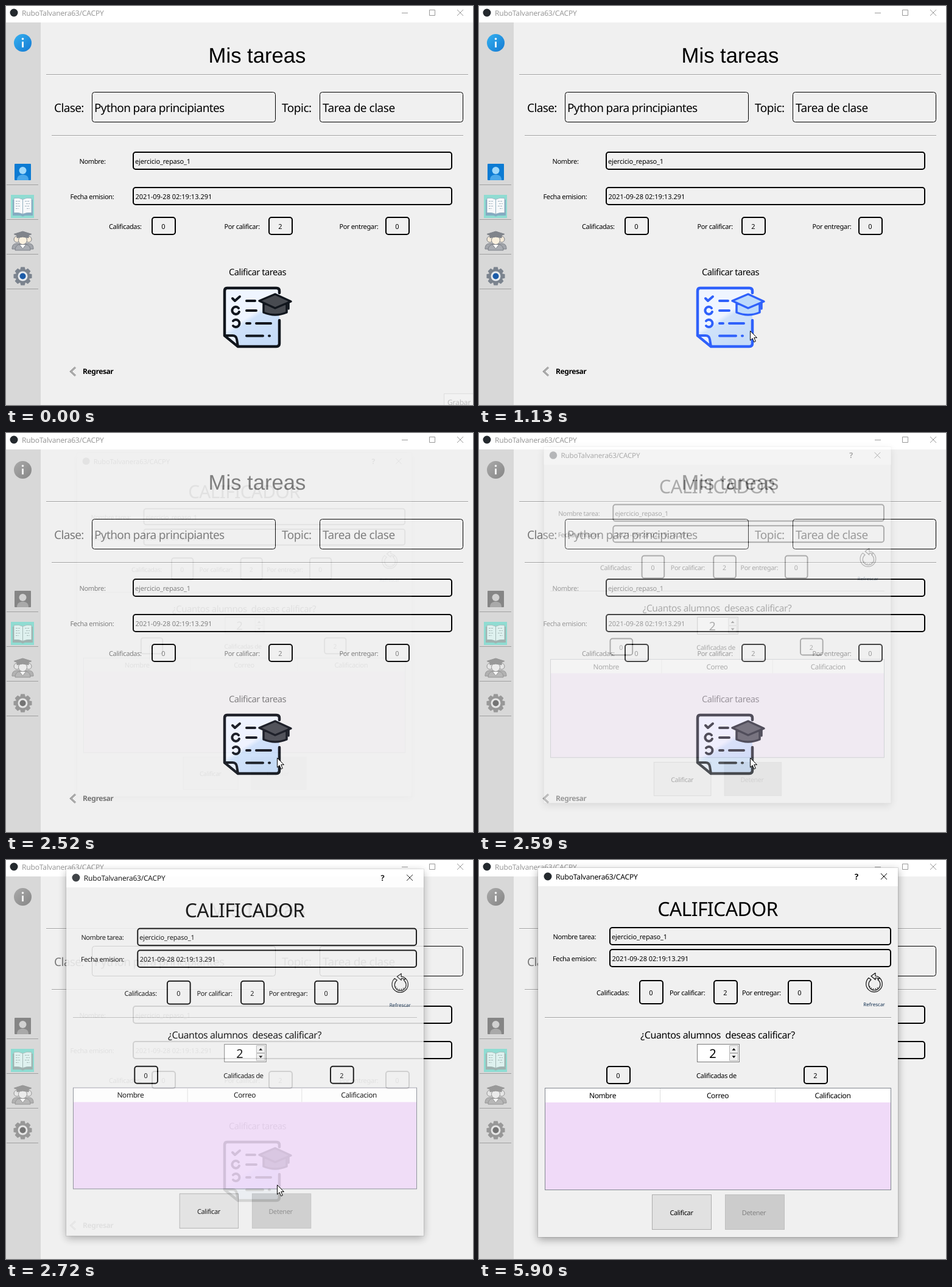
These frames come from a looping animation (767x655 px, 8000 ms). An HTML page:

```html
<!DOCTYPE html>
<html lang="es">
<head>
<meta charset="utf-8">
<title>Mis tareas</title>
<style>
html, body { margin: 0; width: 100%; height: 100%; overflow: hidden; background: #f0f0f0; }
svg { display: block; width: 767px; height: 655px; }
text {
  font: 11px "Noto Sans", "Open Sans", sans-serif;
  letter-spacing: -.033em;
  text-rendering: geometricPrecision;
}
.mid { text-anchor: middle; }
.num { letter-spacing: 0; }
.file { letter-spacing: -.015em; }
.wide { letter-spacing: -.025em; }
.win { font-size: 12px; letter-spacing: -.015em; }
.head { font-size: 12px; }
.big { font-size: 19px; }
.page { font: 34.67px "Liberation Sans", Arial, sans-serif; letter-spacing: 0; }
.box { fill: none; stroke: #000; stroke-width: 2; }
.thin { stroke-width: 1; }
.line { fill: none; stroke: currentColor; }
.rule { stroke: #a0a0a0; }
.lite { stroke: #fff; }

/* every state is held until the next key */
.main, .bar, .side, .task, .grab, .label, .cursor, .click, .dialog {
  animation: 8s step-end infinite;
}
.bar { animation-name: focus; }
.bar text { fill: currentColor; }
.main { animation-name: disable; }
.side { animation-name: gray; }
.task { animation-name: hover; }
.grab { animation-name: leave; }
.label { animation-name: dim; }
.cursor { animation-name: move; }
.click { animation-name: click; }
.dialog { animation-name: open; transform-origin: 393px 316px; }

@keyframes focus {
  0%, 31.5%, 100% { color: #999; }
  29.875% { color: #000; }
}
@keyframes disable {
  0%, 100% { fill: #000; }
  31.5%, 99.99% { fill: #787878; }
}
@keyframes gray {
  0%, 100% { filter: none; }
  31.5%, 99.99% { filter: grayscale(1) opacity(.75); }
}
@keyframes hover {
  0%, 31.5%, 100% { color: #11161d; --cap: #484b51; }
  13.375% { color: #2f61fb; --cap: #bddafb; }
}
@keyframes leave {
  0% { opacity: 1; }
  6.75% { opacity: .66; }
  7.5% { opacity: .33; }
  8.375%, 100% { opacity: 0; }
}
@keyframes dim {
  0% { opacity: 1; }
  .875%, 100% { opacity: .85; }
}
@keyframes move {
  0% { opacity: 0; transform: translate(742px, 640px); }
  11.75% { opacity: 1; transform: translate(742px, 640px); }
  12.5% { opacity: 1; transform: translate(579px, 581px); }
  13.375% { opacity: 1; transform: translate(465px, 541px); }
  14.125% { opacity: 1; transform: translate(445px, 533px); }
  73.75%, 100% { opacity: 0; transform: translate(445px, 533px); }
}
@keyframes click {
  0%, 30.625%, 100% { opacity: 0; }
  29.875% { opacity: 1; }
}
@keyframes open {
  0% { opacity: 0; transform: scale(.9); }
  31.5% { opacity: .06; transform: translate(-1px, -1px) scale(.93); }
  32.375% { opacity: .29; transform: translate(-1px, -.7px) scale(.9645); }
  33.125% { opacity: .65; transform: scale(.983); }
  34% { opacity: .87; transform: scale(.993); }
  34.75% { opacity: .97; transform: scale(.998); }
  35.625%, 100% { opacity: 1; transform: none; }
}
.shade { filter: drop-shadow(0 4px 7px rgba(0, 0, 0, .34)); }
</style>
</head>
<body>
<svg viewBox="0 0 767 655">
  <defs>
    <linearGradient id="paper" x1="0" y1="0" x2=".6" y2="1">
      <stop offset=".55" stop-color="#eff5ff"/>
      <stop offset=".62" stop-color="#cfe2fa"/>
      <stop offset="1" stop-color="#c6dcf8"/>
    </linearGradient>
    <linearGradient id="blue" x1="0" y1="0" x2="1" y2="1">
      <stop offset="0" stop-color="#35b1f0"/>
      <stop offset="1" stop-color="#1479d2"/>
    </linearGradient>
    <path id="tooth" d="M-3.2-15h6.4l1.4 6h-9.2z"/>
    <path id="close" class="line" d="M-5-5l10 10M5-5l-10 10"/>
  </defs>

  <rect width="767" height="655" fill="#f0f0f0"/>
  <rect y="27" width="57" height="628" fill="#d8d8d8"/>

  <!-- window bar -->
  <g class="bar">
    <rect width="767" height="27" fill="#fff"/>
    <circle cx="13" cy="11" r="6.5" fill="#24292e"/>
    <text class="win" x="26" y="16">RuboTalvanera63/CACPY</text>
    <path class="line" d="M650 11.5h10M695.5 6.5h9v9h-9z"/>
    <use href="#close" x="746" y="11"/>
  </g>

  <!-- side bar -->
  <path class="rule" d="M1 293.5h52M1 350.5h52M1 407.5h52M1 464.5h52"/>
  <rect x="8" y="310" width="38" height="38" fill="#8fdcd2"/>
  <g class="side">
    <circle cx="27.5" cy="60.5" r="14.5" fill="url(#blue)"/>
    <circle cx="27.5" cy="54" r="1.8" fill="#fff"/>
    <path d="M27.5 58.5v9.5" stroke="#fff" stroke-width="2.8"/>

    <rect x="14" y="259" width="27" height="27" rx="1" fill="#0c7bd3"/>
    <path d="M18 286c0-7 4-9 9.5-9s9.5 2 9.5 9z" fill="#4aa8ea"/>
    <circle cx="27.5" cy="270" r="6" fill="#9fd8fa"/>

    <path d="M11 318h33v26h-13l-3.5 1.5-3.5-1.5h-13z" fill="#84abc2"/>
    <path d="M13 315.5q8-1.5 14.5 2v24q-7-3-14.5-2zM42 315.5q-8-1.5-14.5 2v24q7-3 14.5-2z" fill="#f6f8fa" stroke="#8fabbb" stroke-width=".8"/>
    <path d="M16 320.5h8M16 324.5h6M16 328.5h8M16 332.5h5M31 320.5h8M33 324.5h6M31 328.5h8M34 332.5h5" stroke="#a3b4c0" stroke-dasharray="3 1"/>

    <g stroke="#7b7f86">
      <path d="M10 399c0-7 3-9 8-9h19c5 0 8 2 8 9z" fill="#a3a6ac"/>
      <circle cx="18" cy="383" r="5" fill="#f3e8d6"/>
      <circle cx="37" cy="383" r="5" fill="#f3e8d6"/>
      <path d="M15 401c0-8 5-10 12.5-10s12.5 2 12.5 10z" fill="#a9acb2"/>
      <path d="M22 391.500l5.5 7 5.5-7z" fill="#fff"/>
      <circle cx="27.5" cy="384.5" r="7" fill="#faf0de"/>
      <path d="M13 374.5l14.5-4.5 14.5 4.5-5 2v4q-9.5-3-19 0v-4z" fill="#80848b"/>
    </g>

    <g transform="translate(27.5 443.5)" fill="#7b838e">
      <circle r="11.5"/>
      <use href="#tooth"/>
      <use href="#tooth" transform="rotate(45)"/>
      <use href="#tooth" transform="rotate(90)"/>
      <use href="#tooth" transform="rotate(135)"/>
      <use href="#tooth" transform="rotate(180)"/>
      <use href="#tooth" transform="rotate(225)"/>
      <use href="#tooth" transform="rotate(270)"/>
      <use href="#tooth" transform="rotate(315)"/>
      <circle r="8" fill="#e6eaee"/>
      <circle r="5" fill="#1b5ba8"/>
    </g>
  </g>

  <!-- task page -->
  <path class="rule" d="M66 112.5h693M75 212.5h676"/>
  <path class="lite" d="M66 113.5h693M75 213.5h676"/>
  <g class="box">
    <g class="thin">
      <rect x="141.5" y="141.5" width="301" height="49" rx="4"/>
      <rect x="515.5" y="141.5" width="235" height="49" rx="4"/>
    </g>
    <rect x="209" y="240" width="523" height="28" rx="4"/>
    <rect x="209" y="298" width="523" height="28" rx="4"/>
    <rect x="240" y="347" width="38" height="28" rx="4"/>
    <rect x="432" y="347" width="38" height="28" rx="4"/>
    <rect x="624" y="347" width="38" height="28" rx="4"/>
  </g>
  <g class="main">
    <text class="page mid" x="412.5" y="93">Mis tareas</text>
    <text class="big" x="79" y="174">Clase:</text>
    <text class="big" x="145" y="174">Python para principiantes</text>
    <text class="big wide" x="453" y="174">Topic:</text>
    <text class="big wide" x="520" y="174">Tarea de clase</text>
    <text x="120.5" y="259">Nombre:</text>
    <text class="file" x="212" y="259">ejercicio_repaso_1</text>
    <text x="105.5" y="317">Fecha emision:</text>
    <text class="num" x="212.5" y="317">2021-09-28 02:19:13.291</text>
    <text x="169" y="366">Calificadas:</text>
    <text x="358.5" y="366">Por calificar:</text>
    <text x="547.5" y="366">Por entregar:</text>
    <text class="mid num" x="258.5" y="366">0</text>
    <text class="mid num" x="450.5" y="366">2</text>
    <text class="mid num" x="642.5" y="366">0</text>
    <text class="mid" x="413" y="442" style="font-size:14.67px">Calificar tareas</text>
    <text x="126" y="604" style="font-size:12px;font-weight:700">Regresar</text>
  </g>
  <path d="M114 593l-7.5 7 7.5 7" fill="none" stroke="#8a8a8a" stroke-width="3"/>
  <path d="M114 593l-7.5 7 7.5 7" fill="none" stroke="#d5d5d5"/>

  <g class="task" stroke="currentColor" stroke-width="4.5" stroke-linecap="round" stroke-linejoin="round">
    <path d="M363 463h81q5 0 5 5v86q0 5-5 5h-63l-22-18v-73q0-5 4-5z" fill="url(#paper)" stroke="none"/>
    <path d="M449 471v-3q0-5-5-5h-81q-4 0-4 5v73l22 18h63q5 0 5-5v-38" fill="none"/>
    <path d="M359 541h13q6 0 7 6l2 12z" fill="#e9f1fd" stroke-width="4"/>
    <g fill="none" stroke-width="4">
      <path d="M372 480l4 4 8-7M395 484h14M395 500h16M395 521h6M411 521h24M395 541.5h27M432 541.5h1"/>
      <path d="M382 496a6 6 0 1 0 1 6M373 517a6 6 0 1 1 0 8"/>
    </g>
    <g stroke-width="3.5" style="fill:var(--cap)">
      <path d="M423 489v14q19 8 38 0v-14z"/>
      <path d="M416 484l26-11 26 12-26 11z"/>
      <path d="M464 487v10" fill="none"/>
    </g>
  </g>

  <g class="grab">
    <rect x="719.5" y="636.5" width="60" height="40" fill="#f2f2f2" stroke="#dedede"/>
    <text class="win label" x="725" y="655" fill="#bcbcbc">Grabar</text>
  </g>

  <!-- grading dialog -->
  <g class="dialog">
    <rect class="shade" x="97" y="13" width="591" height="606" fill="#f0f0f0"/>
    <rect x="96.5" y="12.5" width="592" height="607" fill="none" stroke="#000" stroke-opacity=".1"/>
    <rect x="97" y="13" width="591" height="30" fill="#fff"/>
    <circle cx="113" cy="27" r="6.5" fill="#24292e"/>
    <text class="win" x="126" y="32">RuboTalvanera63/CACPY</text>
    <text class="mid" x="620" y="32" style="font-size:13px;font-weight:600">?</text>
    <use href="#close" x="665" y="27"/>

    <text class="mid" x="392" y="92" style="font-size:32px;letter-spacing:-.02em">CALIFICADOR</text>
    <text x="121.5" y="130">Nombre tarea:</text>
    <text class="file" x="218" y="130">ejercicio_repaso_1</text>
    <text x="121" y="166">Fecha emision:</text>
    <text class="num" x="218.5" y="166">2021-09-28 02:19:13.291</text>
    <text x="193" y="222">Calificadas:</text>
    <text x="313" y="222">Por calificar:</text>
    <text x="432" y="222">Por entregar:</text>
    <text class="mid num" x="282.5" y="222">0</text>
    <text class="mid num" x="404.5" y="222">2</text>
    <text class="mid num" x="526.5" y="222">0</text>
    <g class="box">
      <rect x="215" y="111" width="461" height="28" rx="4"/>
      <rect x="215" y="147" width="461" height="28" rx="4"/>
      <rect x="264" y="198" width="38" height="38" rx="4"/>
      <rect x="386" y="198" width="38" height="38" rx="4"/>
      <rect x="508" y="198" width="38" height="38" rx="4"/>
      <rect x="210" y="339" width="38" height="28" rx="4"/>
      <rect x="534" y="339" width="38" height="28" rx="4"/>
    </g>

    <g fill="none" stroke="#111" stroke-width="1.2" stroke-linejoin="round">
      <path d="M640 193.500a13.300 13.300 0 1 0 18 0l-3 3a9.500 9.500 0 1 1-11 0z"/>
      <path d="M651 185.500l-7 5 7 6v-3q4 0 5 2l2-2q-3-3-7-3z"/>
      <path d="M641.500 207a9 9 0 0 0 15 1" stroke-dasharray="1.5 2"/>
    </g>
    <text class="mid num" x="649" y="240" fill="#0b2a4c" style="font-size:8px">Refrescar</text>

    <path class="rule" d="M108 258.5h569"/>
    <path class="lite" d="M108 259.5h569"/>
    <text class="mid wide" x="392" y="293" style="font-size:16px">¿Cuantos alumnos&#160; deseas calificar?</text>

    <rect x="358.5" y="302.5" width="69" height="29" fill="#fff" stroke="#7a7a7a"/>
    <path d="M411.5 304.5h14v12h-14zM411.5 317.5h14v12h-14z" fill="#f0f0f0" stroke="#b5b5b5"/>
    <path d="M415.5 312.5l3-3.5 3 3.5zM415.5 321.5l3 3.5 3-3.5z"/>
    <text class="mid num" x="384" y="325" style="font-size:20px">2</text>

    <text class="mid num" x="228.5" y="358">0</text>
    <text x="357" y="358">Calificadas de</text>
    <text class="mid num" x="552.5" y="358">2</text>

    <rect x="108.5" y="374.5" width="568" height="167" fill="#f0daf8" stroke="#828790"/>
    <rect x="109" y="375" width="567" height="23" fill="#fff"/>
    <path d="M297.5 375v23M486.5 375v23" stroke="#dedede"/>
    <text class="head mid" x="203" y="391">Nombre</text>
    <text class="head mid" x="392" y="391">Correo</text>
    <text class="head mid" x="581" y="391">Calificacion</text>

    <rect x="284.5" y="549.5" width="97" height="57" fill="#e1e1e1" stroke="#adadad"/>
    <text class="mid" x="332.5" y="583">Calificar</text>
    <rect x="404.5" y="549.5" width="97" height="57" fill="#ccc" stroke="#bfbfbf"/>
    <text class="mid" x="451.5" y="583" fill="#838383">Detener</text>
  </g>

  <circle class="click" cx="445.5" cy="533.5" r="11.5" fill="#f5ee3c" fill-opacity=".68"/>
  <path class="cursor" d="M.5.5v15.500l3.600-3.400 2.600 6 2.600-1.100-2.600-5.900h4.800z" fill="#fff" stroke="#000"/>
</svg>
</body>
</html>
```
